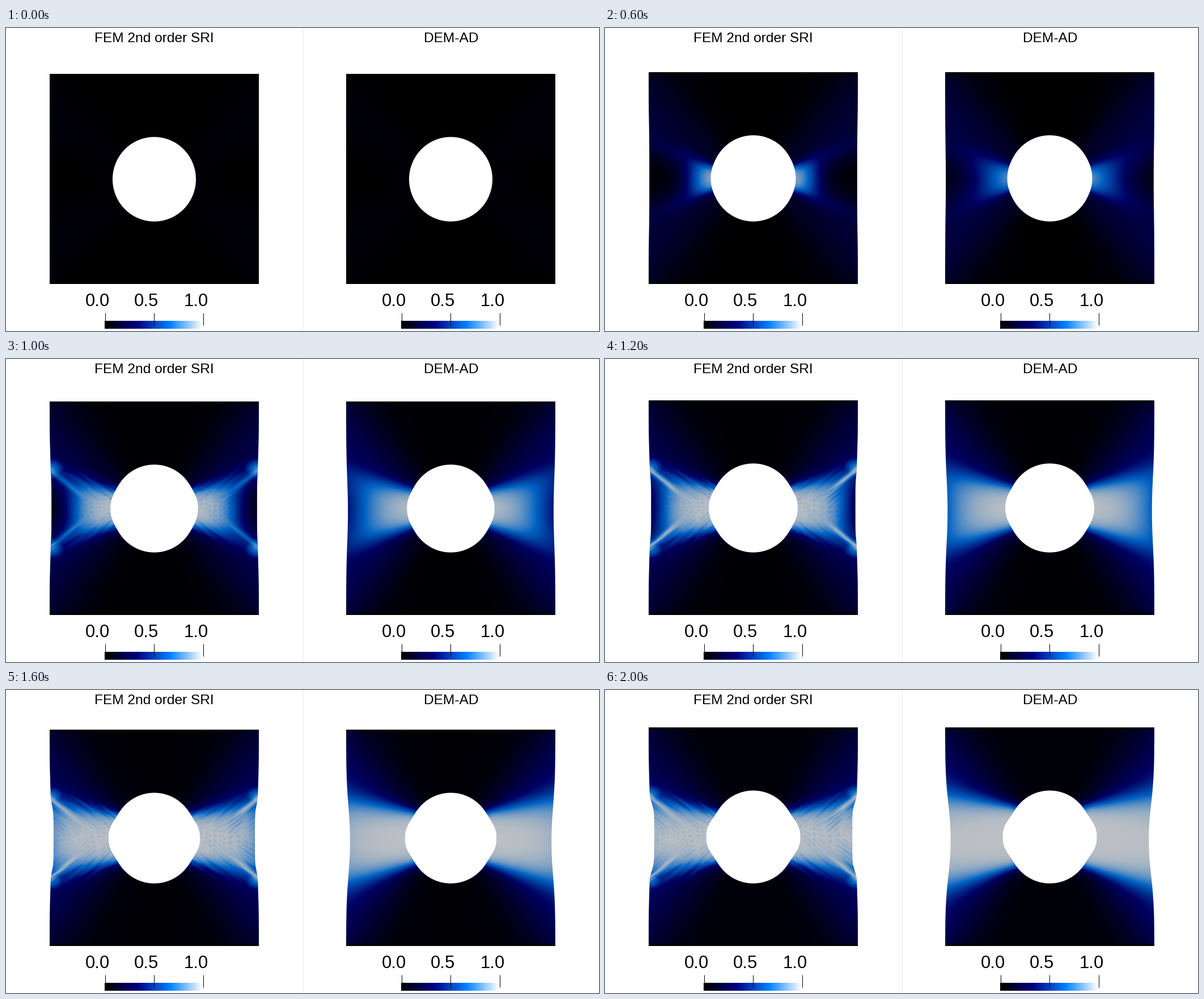
A matplotlib script that plays this animation: 1046 px wide and 535 px high, repeating every 2.2 s.

```python
import numpy as np
import matplotlib.pyplot as plt
from matplotlib.animation import FuncAnimation
from matplotlib.colors import LinearSegmentedColormap
from matplotlib.patches import Polygon

W, H, DPI = 1046, 535, 100
FRAMES, INTERVAL = 11, 200
CY, HALF, RX, RY = 267.0, 184.5, 73.5, 74.6
TOP, BOTTOM = 186, -185          # plate edges, measured up from the hole centre
SHADE = np.array([0.775, 0.77, 0.765])
CMAP = LinearSegmentedColormap.from_list(
    "damage", ["#000000", "#000080", "#0080ff", "#ffffff"], N=512)


def ramp(v, start, end):
    return np.clip((v - start) / (end - start), 0, 1)


def falloff(v, edge, width):
    return 1 / (1 + np.exp(np.clip((v - edge) / width, -40, 40)))


def to_y(h, s):
    """Screen height of a material point lying h above the hole centre."""
    lift = np.round(1.64 * s - 0.1)
    return CY - h - lift * 0.5 * (1 + np.tanh(h / 30))


def waves(rng, x, h, sign, count=24):
    """Long crests running along one diagonal."""
    total = 0
    for _ in range(count):
        ang = rng.uniform(0.4, 0.8)
        k = 2 * np.pi / rng.uniform(7, 18)
        total = total + np.cos(k * (np.cos(ang) * h - sign * np.sin(ang) * x)
                               + rng.uniform(0, 2 * np.pi))
    return total / np.sqrt(count / 2)


def streaks(x, h):
    rng = np.random.default_rng(4)
    mix = 0.5 + 0.5 * np.tanh(x * h / 2500)
    return mix * waves(rng, x, h, 1) + (1 - mix) * waves(rng, x, h, -1)


class Plate:
    """Stretched plate with a hole; the damage band spreads from the hole."""
    lobe, power, drift = 0.30, 2, 0.8

    def __init__(self, ax, cx):
        self.cx = cx
        x0, x1, y0, y1 = int(cx - HALF) - 1, int(cx + HALF) + 1, 63, 454
        self.x = (np.arange(x0, x1) + 0.5 - cx)[None, :]
        self.y = np.arange(y0, y1) + 0.5
        self.image = ax.imshow(np.zeros((y1 - y0, x1 - x0, 3)),
                               extent=(x0, x1, y1, y0), interpolation="nearest",
                               aspect="auto", zorder=1)
        start = [(0, 0), (1, 0), (1, 1)]
        self.edge = ax.add_patch(Polygon(start, fc="none", ec="none"))
        self.hole = ax.add_patch(Polygon(start, fc="white", ec="none", zorder=2))

    def front(self, s):
        """How far the band reaches from the hole, and how softly it ends."""
        return 28 * (s - 0.6), 26

    def band(self, s):
        """Half height of the band at the hole and at the outer edge."""
        return 2 + 16 * np.sqrt(max(s, 1)), 60 + 2.2 * s

    def inset(self, h, pinch):
        return pinch * np.exp(-((h + 5) / 76) ** 2)

    def grain(self, h, s):
        return 0

    def detail(self, d, dx, ah, grain, s):
        return d

    def outline(self, s):
        h = np.linspace(BOTTOM, TOP, 260)
        half = HALF - self.inset(h, 0.45 * s ** 1.4)
        y = to_y(h, s)
        left = np.column_stack([self.cx - half, y])
        right = np.column_stack([self.cx + half, y])
        return np.vstack([left, right[::-1]])

    def rim(self, s):
        a = np.linspace(0, 2 * np.pi, 181)
        h = RY * np.sin(a)
        bulge = 1.15 * max(s - 0.8, 0) * np.exp(-np.abs(h / 26) ** 3)
        return np.column_stack([self.cx + RX * np.cos(a) + bulge * np.sign(np.cos(a)),
                                to_y(h, s)])

    def damage(self, s):
        grid = np.linspace(-200, 200, 801)
        h = np.interp(-self.y, -to_y(grid, s), grid)[:, None]
        dx = np.abs(self.x)
        e = np.clip(dx - RX, 0, None)
        ah = np.abs(h + self.drift * s * e / 110)
        grain = self.grain(h, s)

        # Damage along the middle of the band and along its two arms
        reach, soft = self.front(s)
        axis = 0.985 * min(1, 0.1 + s) * falloff(e, reach, soft)
        cap = 1 - 0.8 / max(s, 1) ** 1.2
        arm = cap * min(1, 0.1 + s) * falloff(e, 28 * (s - 0.6) + 40, 40)
        near, far = self.band(s)
        limit = near + (far - near) * (dx - RX) / 110
        core = axis + (arm - axis) * np.clip(ah / limit, 0, 1) ** self.power
        core = core * falloff(ah + 1.5 * grain, limit, 5 + 0.08 * e)

        # Faint diagonal lobes towards the corners
        phi = np.arctan2(ah, dx)
        level = 0.03 + (self.lobe - 0.03) * (1 - np.exp(-s / 1.8))
        side = level * np.exp(-((phi - 0.55) / 0.35) ** 2)
        side = side * (dx / HALF) ** (0.4 + 0.08 * min(s, 5)) + 0.003 * s

        d = self.detail(1 - (1 - core) * (1 - side), dx, ah, grain, s)
        d = d * ramp(h, TOP, TOP - 6) * ramp(h, BOTTOM, BOTTOM + 6)
        return np.clip(d, 0, 1)

    def update(self, s):
        self.edge.set_xy(self.outline(s))
        self.hole.set_xy(self.rim(s))
        self.image.set_data(CMAP(self.damage(s))[..., :3] * SHADE)
        self.image.set_clip_path(self.edge)
        return self.image, self.hole


class StreakyPlate(Plate):
    """Sharper band with streaks, and knots where its arms meet the edge."""
    lobe, power, drift = 0.24, 3, 0

    def front(self, s):
        return 19 * (s - 0.2), 14

    def band(self, s):
        return min(2 + 16 * np.sqrt(max(s, 1)), 41), 64

    def inset(self, h, pinch):
        broad = min(pinch, 2)
        return (broad * np.exp(-(h / 105) ** 4)
                + (pinch - broad) * np.exp(-(h / 55) ** 6))

    def grain(self, h, s):
        return streaks(self.x, h) * ramp(s, 1, 4)

    def detail(self, d, dx, ah, grain, s):
        knot = 0.72 * ramp(s, 2, 3.6) * np.exp(-((dx - 182) / 24) ** 2
                                               - ((ah - 67) / 19) ** 2)
        d = np.maximum(d, knot + 0.25 * d * (1 - knot))
        ridge = np.exp(-((ah - 64 + 0.8 * (182 - dx)) / 6) ** 2) * ramp(dx, 115, 145)
        d = d + np.clip(0.97 - d, 0, 1) * 0.9 * ramp(s, 3, 5) * ridge
        return d - 0.025 * np.abs(grain) * ramp(d, 0.35, 0.85)


def label(ax, x, y, text, px):
    ax.text(x, y, text, fontsize=px * 72 / DPI, family="Liberation Sans",
            ha="center", va="baseline", color="black")


def legend(ax, x):
    ax.imshow(np.linspace(0, 1, 173)[None, :], cmap=CMAP, aspect="auto",
              extent=(x, x + 173, 531, 517), interpolation="nearest")
    for dx, tx, text in [(0.5, -12.5, "0.0"), (86.5, 73.5, "0.5"), (173.5, 161, "1.0")]:
        ax.plot([x + dx] * 2, [503, 525], color="black", lw=0.72, solid_capstyle="butt")
        label(ax, x + tx, 491, text, 31)


fig = plt.figure(figsize=(W / DPI, H / DPI), dpi=DPI, facecolor="white")
ax = fig.add_axes([0, 0, 1, 1])
plates = [StreakyPlate(ax, 261.5), Plate(ax, 784.5)]
for plate, title in zip(plates, ["FEM 2nd order SRI", "DEM-AD"]):
    label(ax, plate.cx + 0.3, 25, title, 24.5)
    legend(ax, plate.cx - 87.5)
ax.plot([523.5, 523.5], [0, H], color="#ebebeb", lw=0.72)
ax.set_xlim(0, W)
ax.set_ylim(H, 0)
ax.axis("off")


def draw(i):
    s = max(0, i - 1)
    return [artist for p in plates for artist in p.update(s)]


anim = FuncAnimation(fig, draw, frames=FRAMES, interval=INTERVAL,
                     repeat=True, repeat_delay=0, blit=False)
plt.show()
```
